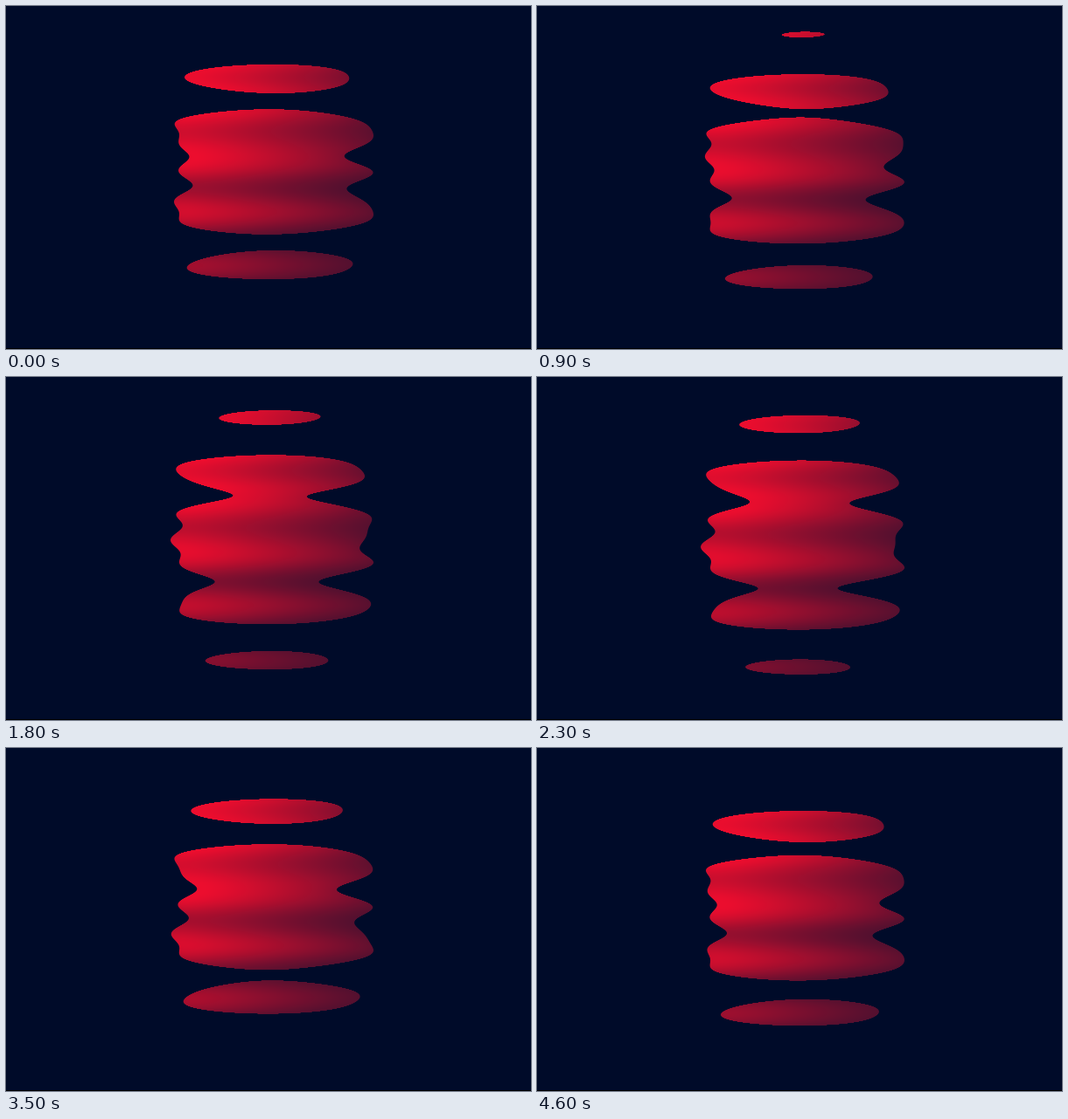
Animation, 600 px wide and 393 px high, one loop 4.7 s. Source, as an HTML page with a canvas:

```html
<!DOCTYPE html>
<html lang="en">
<head>
<meta charset="utf-8">
<title>Rippled sphere</title>
<style>
  html, body { margin: 0; width: 100%; height: 100%; overflow: hidden; background: #000b29; }
  canvas { display: block; }
</style>
</head>
<body>
<canvas id="stage" width="600" height="393"></canvas>
<script>
const ctx = document.getElementById('stage').getContext('2d');
const LOOP = 4700, STEP = 100, SPEED = 0.0015;
const R = 111, CX = 303.5, CY = 190;
const BACK = [0, 11, 41], DARK = [82, 16, 47], BRIGHT = [238, 13, 46];
const LIGHT = [-0.7, -0.65, 0.25];
const LEFT = 180, TOP = 20, W = 246, H = 344;
const image = ctx.createImageData(W, H);
const mix = (a, b, k) => a + (b - a) * k;

// A sphere seen through sine-warped space, shaded by its unwarped normal.
function draw(time) {
  const phase = time * SPEED;
  const px = image.data;
  for (let j = 0, i = 0; j < H; j++) {
    const y = TOP + j + 0.5 - CY;
    const u = y + 50 * Math.sin(0.1 * y - phase);
    const shift = 5.5 * Math.sin(0.139 * y + 1.08 - phase);
    const half2 = R * R - u * u;
    const half = half2 > 0 ? Math.sqrt(half2) : -1;
    for (let col = 0; col < W; col++, i += 4) {
      const v = LEFT + col + 0.5 - CX - shift;
      const cover = Math.max(0, Math.min(1, half - Math.abs(v) + 0.5));
      let tone = 0;
      if (cover) {
        const z = Math.sqrt(Math.max(0, half2 - v * v));
        const lit = (LIGHT[0] * v + LIGHT[1] * u + LIGHT[2] * z) / R;
        tone = Math.pow(Math.max(0, Math.min(1, (lit + 1) / 2)), 1.5);
      }
      for (let c = 0; c < 3; c++) {
        px[i + c] = mix(BACK[c], mix(DARK[c], BRIGHT[c], tone), cover);
      }
      px[i + 3] = 255;
    }
  }
  ctx.putImageData(image, LEFT, TOP);
}

ctx.fillStyle = '#000b29';
ctx.fillRect(0, 0, 600, 393);
ctx.fillStyle = '#000';
ctx.fillRect(0, 392, 600, 1);

const start = performance.now();
let shown = -1;
function tick() {
  const time = Math.floor(((performance.now() - start) % LOOP) / STEP) * STEP;
  if (time !== shown) draw(shown = time);
  requestAnimationFrame(tick);
}
tick();
</script>
</body>
</html>
```
